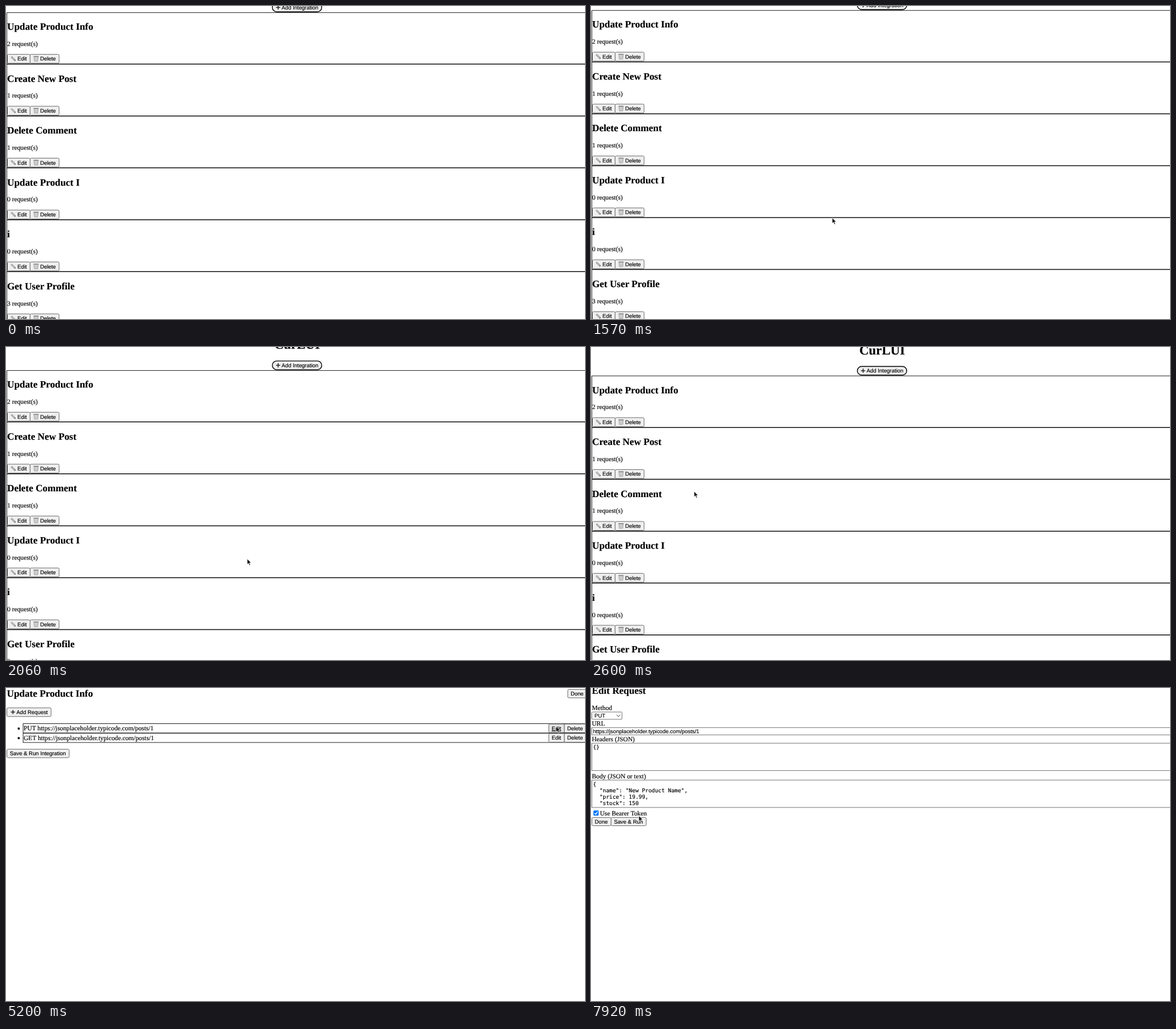
An HTML page that plays this animation: 1000x540 px, repeating every 8 s.

```html
<!DOCTYPE html>
<html lang="en">
<head>
<meta charset="utf-8">
<title>Integrations</title>
<style>
  html, body { margin: 0; width: 100%; height: 100%; overflow: hidden; background: #fff; }
  svg { display: block; width: 100vw; height: 100vh; }
  text { white-space: pre; fill: #000; stroke: #000; stroke-width: .15; text-rendering: geometricPrecision; }
  path { fill: none; }
  .body { font: 11.25px "Liberation Serif", serif; }
  .h2 { font: bold 16.88px "Liberation Serif", serif; }
  .h1 { font: bold 22.5px "Liberation Serif", serif; text-anchor: middle; }
  .ui { font: 9.375px "Liberation Sans", sans-serif; }
  .code { font: 9.375px "DejaVu Sans Mono", monospace; }
  .btn rect { fill: #efefef; stroke: #6c6c6c; }
  .btn.hover rect { fill: #e5e5e5; }
  .btn.hover.link text { text-decoration: underline; }
  .field { fill: #fff; stroke: #767676; }
  .item { fill: none; stroke: #222; }
  .pill { fill: #efefef; stroke: #000; stroke-width: 1.4; }
</style>
</head>
<body>
<svg id="stage" viewBox="0 0 1000 540" preserveAspectRatio="none"></svg>
<script>
const LOOP = 8000;
const stage = document.getElementById('stage');

function add(parent, tag, attrs, content) {
  const el = document.createElementNS('http://www.w3.org/2000/svg', tag);
  for (const k in attrs) el.setAttribute(k, attrs[k]);
  if (content !== undefined) el.textContent = content;
  parent.appendChild(el);
  return el;
}
const text = (parent, cls, x, y, str) => add(parent, 'text', { class: cls, x, y }, str);
const rect = (parent, cls, x, y, width, height, rx = 0) =>
  add(parent, 'rect', { class: cls, x, y, width, height, rx });
const path = (parent, d, stroke, width = 1) =>
  add(parent, 'path', { d, stroke, 'stroke-width': width });

const plus = (parent, x, y) => path(parent, `M${x - 3.6} ${y}h7.2M${x} ${y - 3.6}v7.2`, '#222', 1.5);
function pencil(parent, x, y) {
  path(parent, `M${x + 1.2} ${y + 1.2}l7 7`, '#777', 2.6);
  path(parent, `M${x + 1.4} ${y + 1.4}l5.6 5.6`, '#ddd', 1.1);
}
function bin(parent, x, y) {
  path(parent, `M${x + .6} ${y + 1}h7.4l-.8 8h-5.8z`, '#909090', .7).style.fill = '#ccc';
  path(parent, `M${x} ${y + .7}h8.6`, '#777', 1.2);
}

// Buttons side by side, each as wide as its label; boxes are kept for hover tests.
function buttonRow(parent, x, y, h, labels, lead = 5, cls = '') {
  return labels.map(label => {
    const el = add(parent, 'g', { class: 'btn ' + cls });
    const frame = rect(el, '', x, y, 0, h, 2);
    const w = lead + text(el, 'ui', x + lead, y + h / 2 + 3.3, label).getComputedTextLength() + 5.7;
    frame.setAttribute('width', w);
    x += w;
    return { el, x: x - w, y, w, h };
  });
}

function makeList(page) {
  const pitch = 89.55;
  const items = { 'Update Product Info': 2, 'Create New Post': 1, 'Delete Comment': 1,
    'Update Product I': 0, 'i': 0, 'Get User Profile': 3 };
  text(page, 'h1', 503, -26, 'CurLUI');
  rect(page, 'pill', 460, -5, 85.3, 15, 7.5);
  plus(page, 470, 2.4);
  text(page, 'ui', 476, 5.8, 'Add Integration');
  path(page, 'M1000 11.4H1.5V600', '#222');
  return Object.entries(items).flatMap(([name, count], i) => {
    const y = 11 + i * pitch;
    text(page, 'h2', 2, y + 30, name);
    text(page, 'body', 2, y + 57.8, `${count} request(s)`);
    const row = buttonRow(page, 2.5, y + 72.4, 15.4, ['Edit', 'Delete'], 17.3);
    pencil(page, 8, y + 75.3);
    bin(page, row[1].x + 6, y + 75.3);
    path(page, `M1 ${y + pitch - .4}H1000`, '#111', 1.5);
    return row;
  });
}

function makeDetail(page) {
  text(page, 'h2', 1.5, 15.3, 'Update Product Info');
  const buttons = [
    ...buttonRow(page, 970.2, 2.5, 14.5, ['Done']),
    ...buttonRow(page, 1.6, 34.2, 15, ['Add Request'], 16.5),
    ...buttonRow(page, 1.6, 105.6, 14.6, ['Save & Run Integration'])
  ];
  plus(page, 12, 41.5);
  ['PUT', 'GET'].forEach((method, i) => {
    const y = 61.5 + i * 16.5;
    add(page, 'circle', { cx: 22, cy: y + 8.5, r: 1.9 });
    rect(page, 'item', 29.6, y, 975, 16);
    text(page, 'body', 30.5, y + 11.6, method + ' https://jsonplaceholder.typicode.com/posts/1');
    buttons.push(...buttonRow(page, 937.5, y + .6, 14.9, ['Edit', 'Delete'], 5, 'link'));
  });
  return buttons;
}

// Each field is a label, a frame and its text lines; the next one follows below.
const fields = [];
function makeForm(page) {
  let y = 38;
  const field = (label, w, h, cls, lines, gap = 10.9) => {
    text(page, 'body', 1.5, y, label);
    const top = y + 3.4;
    rect(page, 'field', 1.5, top, w, h, w < 100 ? 1 : 0);
    lines.forEach((line, i) => text(page, cls, 3.4, top + 9.8 + i * 11, line));
    if (w > 100) fields.push({ x: 0, y: top, w, h });
    y = top + h + gap;
  };
  text(page, 'h2', 1.5, 9.8, 'Edit Request');
  field('Method', 52, 12.6, 'ui', [' PUT'].map(s => s.trimEnd()));
  path(page, 'M44.4 46.4l2.9 2.9l2.9 -2.9', '#333');
  field('URL', 1010, 12.6, 'ui', ['https://jsonplaceholder.typicode.com/posts/1']);
  field('Headers (JSON)', 1010, 47.2, 'code', ['{}'], 13.1);
  field('Body (JSON or text)', 1010, 47.2, 'code',
    ['{', '  "name": "New Product Name",', '  "price": 19.99,', '  "stock": 150']);
  add(page, 'rect', { x: 4.2, y: 211.2, width: 9, height: 9, rx: 1.5, fill: '#0075ff' });
  path(page, 'M6.2 215.9l1.9 2l3.4 -4.6', '#fff', 1.4);
  text(page, 'body', 15.5, 219.8, 'Use Bearer Token');
  return buttonRow(page, 1.6, 223.4, 14.2, ['Done', 'Save & Run']);
}

const pages = [makeList, makeDetail, makeForm].map(make => {
  const el = add(stage, 'g', {});
  return { el, buttons: make(el) };
});

const arrow = path(stage, 'M0 0V9.6L2.2 7.6L3.9 11.4L5.5 10.7L3.9 7H7z', '#fff', .7);
arrow.style.fill = '#111';
const beam = path(stage, 'M-2.5 -5.5Q0 -5.5 0 -4V4Q0 5.5 -2.5 5.5M2.5 -5.5Q0 -5.5 0 -4V4Q0 5.5 2.5 5.5', '#222');

const linear = p => p;
const easeOut = p => 1 - (1 - p) ** 3;
const smooth = p => p * p * (3 - 2 * p);
const progress = (t, from, to) => Math.min(1, Math.max(0, (t - from) / (to - from)));

const scrollAt = t =>
  -4.8 * easeOut(progress(t, 1040, 1340)) + 43.3 * linear(progress(t, 1555, 2200));

// Pointer moves: start, end, where it comes to rest
const moves = [
  [460, 700, 416.6, 365.5], [2510, 2600, 178, 249], [2740, 3550, 21.5, 129],
  [3810, 3990, 478, 156], [4100, 4410, 776, 130], [4550, 5200, 950, 66.3],
  [5750, 6020, 311, 205], [6170, 6580, 66, 228], [6580, 6980, 89, 83],
  [7040, 7210, 89, 103], [7510, 7920, 82.5, 220.3]
];
function pointerAt(t) {
  let x = 494, y = 526;
  for (const [from, to, toX, toY] of moves) {
    const p = smooth(progress(t, from, to));
    x += (toX - x) * p;
    y += (toY - y) * p;
  }
  return [x, y];
}

const show = (el, on) => el.setAttribute('display', on ? 'inline' : 'none');
const inside = (x, y, b) => x >= b.x && x < b.x + b.w && y >= b.y && y < b.y + b.h;

function draw(t) {
  const current = t < 3630 ? 0 : t < 5380 ? 1 : 2;
  const offset = current === 0 ? scrollAt(t) : 0;
  const [x, y] = pointerAt(t);
  pages.forEach((page, i) => show(page.el, i === current));
  pages[0].el.setAttribute('transform', `translate(0 ${offset})`);
  for (const b of pages[current].buttons) b.el.classList.toggle('hover', inside(x, y - offset, b));

  const typing = current === 2 && fields.some(f => inside(x, y, f));
  const cursor = typing ? beam : arrow;
  show(arrow, t >= 490 && !typing);
  show(beam, typing);
  cursor.setAttribute('transform', `translate(${x} ${y})`);
}

const start = performance.now();
function tick() {
  draw((performance.now() - start) % LOOP);
  requestAnimationFrame(tick);
}
tick();
</script>
</body>
</html>
```
